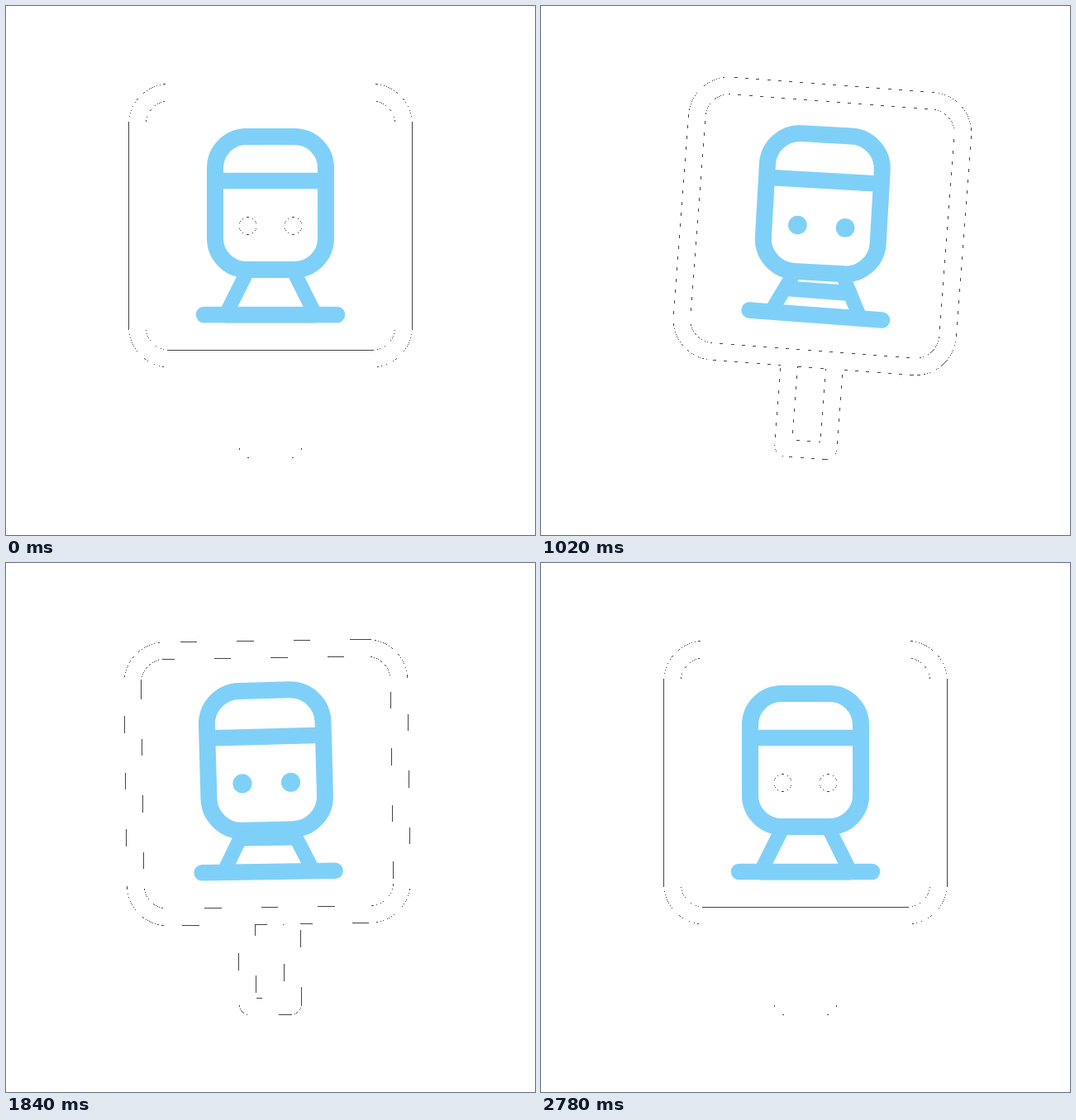
These frames come from a looping animation (640x640 px, 3360 ms). An HTML page with a canvas:

```html
<!DOCTYPE html>
<html>
<head>
<meta charset="utf-8">
<style>
html, body { margin: 0; width: 100%; height: 100%; overflow: hidden; background: #fff; }
canvas { display: block; }
</style>
</head>
<body>
<canvas width="640" height="640"></canvas>
<script>
const g = document.querySelector('canvas').getContext('2d');
const LOOP = 3360, END = 2780, STEP = 20;
const BLUE = '#7fd0f8', EDGE = '#444';
const PIVOT = { x: 320, y: 537 }, JOINT = 329;

// [time, degrees]
const SWING = [[300, 0], [900, 6.2], [1360, -5], [1700, 2.3], [1900, -1.7], [2100, 0]];
const LEAN = [[500, 0], [900, -1.5], [1340, 1.1], [1650, -1.72], [2000, 0]];

function ease(keys, t) {
  if (t <= keys[0][0]) return keys[0][1];
  for (let i = 1; i < keys.length; i++) {
    const [t0, a] = keys[i - 1], [t1, b] = keys[i];
    if (t < t1) {
      const u = (t - t0) / (t1 - t0);
      return a + (b - a) * u * u * (3 - 2 * u);
    }
  }
  return keys[keys.length - 1][1];
}

const rad = deg => deg * Math.PI / 180;

// Distance to the outline of a rounded box, centred on x = 320
function ring(x, y, cy, hw, hh, r) {
  const qx = Math.abs(x - 320) - hw + r, qy = Math.abs(y - cy) - hh + r;
  const d = Math.min(Math.max(qx, qy), 0) + Math.hypot(Math.max(qx, 0), Math.max(qy, 0)) - r;
  return Math.abs(d) - 10;
}

const signEdge = (x, y) => Math.min(
  ring(x, y, 265.6, 161.2, 161.2, 39),
  ring(x, y, 481.75, 27.4, 54.75, 3));

// Only the faintest rim of a white shape shows, as single pixels
function rim(x0, y0, x1, y1, dist) {
  g.fillStyle = EDGE;
  for (let y = y0; y < y1; y++)
    for (let x = x0; x < x1; x++) {
      const d = dist(x + .5, y + .5);
      if (d > .15 && d < .45) g.fillRect(x, y, 1, 1);
    }
}

function line(x0, y0, x1, y1, width, cap = 'butt') {
  g.lineWidth = width;
  g.lineCap = cap;
  g.beginPath();
  g.moveTo(x0, y0);
  g.lineTo(x1, y1);
  g.stroke();
}

function turn(x, y, angle) {
  g.translate(x, y);
  g.rotate(angle);
  g.translate(-x, -y);
}

function drawSign(angle) {
  const c = Math.cos(angle), s = Math.sin(angle);
  rim(105, 75, 545, 555, (x, y) => {
    const dx = x - PIVOT.x, dy = y - PIVOT.y;
    return signEdge(PIVOT.x + c * dx + s * dy, PIVOT.y - s * dx + c * dy);
  });
}

function drawTrack(t) {
  const y = 374 - 64 * (t % 695) / 695;
  const half = 31 + (y - 327) / 2;
  line(320 - half, y, 320 + half, y, 19);
  for (const side of [-1, 1])
    line(320 + side * 28, 321, 320 + side * 51.5, 368, 17.5);
  line(239.5, 373.5, 400.5, 373.5, 19.5, 'round');
}

function drawBody(pulse) {
  const k = 1 + .068 * pulse, w = 67 * k, h = 80.5 * k;
  g.beginPath();
  g.roundRect(320 - w, 238.5 - h, 2 * w, 2 * h, 38 * k);
  g.fillStyle = '#fff';
  g.fill();
  g.lineWidth = 20;
  g.stroke();
  const bar = 211.5 - 2 * pulse;
  line(320 - w, bar, 320 + w, bar, 19.5);
}

function drawEyes(pulse, filled) {
  const r = 10.2 + 1.2 * pulse, m = g.getTransform();
  for (const side of [-1, 1]) {
    const eye = m.transformPoint({ x: 320 + side * (27.5 + 2.5 * pulse), y: 266 });
    g.save();
    g.resetTransform();
    if (filled) {
      g.fillStyle = BLUE;
      g.beginPath();
      g.arc(eye.x, eye.y, r + .5, 0, 7);
      g.fill();
    } else {
      const x = Math.round(eye.x), y = Math.round(eye.y);
      rim(x - 15, y - 15, x + 15, y + 15, (px, py) => Math.hypot(px - eye.x, py - eye.y) - r);
    }
    g.restore();
  }
}

function draw(t) {
  const swing = ease(SWING, t), lean = ease(LEAN, t);
  const pulse = (1 - Math.cos(2 * Math.PI * t / 1390)) / 2;
  g.resetTransform();
  g.fillStyle = '#fff';
  g.fillRect(0, 0, 640, 640);
  drawSign(rad(swing));
  g.strokeStyle = BLUE;
  turn(PIVOT.x, PIVOT.y, rad(swing));
  drawTrack(t);
  turn(320, JOINT, rad(lean));
  drawBody(pulse);
  drawEyes(pulse, Math.abs(swing + lean) > .5);
}

const start = performance.now();
let shown = -1;
function tick() {
  const now = Math.max(0, performance.now() - start) % LOOP;
  const t = Math.min(END, Math.floor(now / STEP) * STEP);
  if (t !== shown) draw(shown = t);
  requestAnimationFrame(tick);
}
tick();
</script>
</body>
</html>
```
